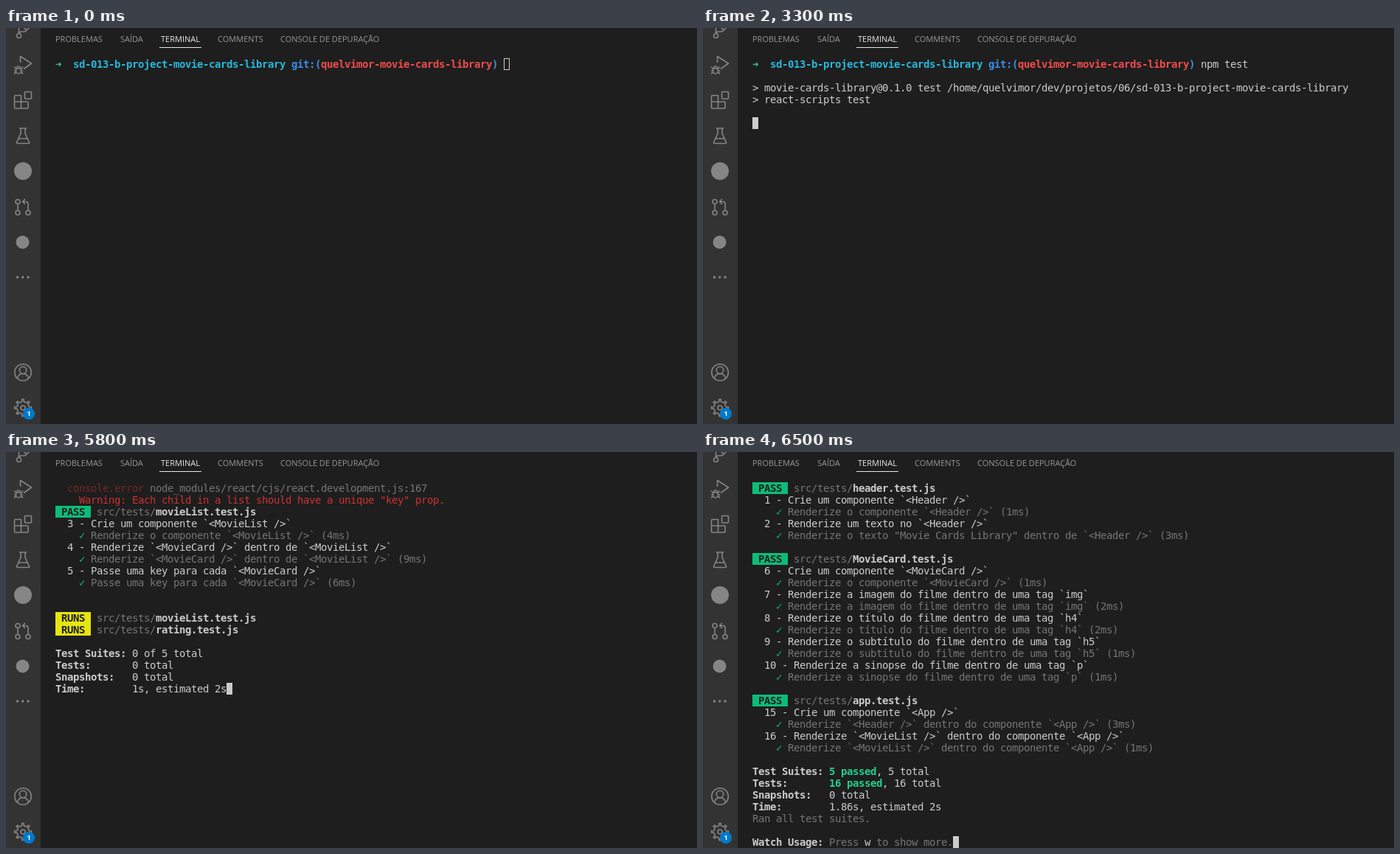
Write an HTML page that moves like this. It is 937x537 px and loops after 8000 ms.

```html
<!DOCTYPE html>
<html lang="pt-BR">
<head>
<meta charset="utf-8">
<title>Terminal</title>
<style>
  html, body { margin: 0; width: 100%; height: 100%; overflow: hidden; background: #1e1e1e; }
  #stage { position: relative; width: 937px; height: 537px; overflow: hidden; background: #1e1e1e; }
  #bar { position: absolute; left: 0; top: 0; background: #333; }
  #bar .line { fill: none; stroke: #858585; stroke-width: 1.6; stroke-linejoin: round; }
  #bar .solid { fill: #858585; }
  #tabs span {
    position: absolute; top: 7px; white-space: pre; color: #979797;
    font: 11px/16px "Open Sans", sans-serif;
  }
  #tabs .on { color: #e7e7e7; }
  #tabs i { position: absolute; left: 208px; top: 26px; width: 57px; height: 1px; background: #e7e7e7; }
  #term {
    position: absolute; left: 67px; top: 41px; color: #ccc;
    font: 14px/16px "DejaVu Sans Mono", monospace; letter-spacing: calc(8px - 1ch);
    font-variant-ligatures: none;
  }
  #term div { height: 16px; white-space: pre; }
  #term span { display: inline-block; height: 16px; vertical-align: top; }
  .b, .G, .a, .c, .u, .e, .p, .y { font-weight: bold; }
  .d { color: #757575; }
  .r { color: #cd3131; }
  .R { color: #762828; }
  .G, .a { color: #23d18b; }
  .g { color: #0dbc79; }
  .a, .g { width: 8px; }
  .c { color: #29b8db; }
  .u { color: #3b8eea; }
  .e { color: #f14c4c; }
  .p, .y { color: #1e1e1e; background: #0dbc79; }
  .y { background: #e5e510; }
  #cursor {
    position: absolute; width: 8px; height: 16px; box-sizing: border-box;
    border: 1px solid #ccc; background: #ccc;
  }
  #cursor.hollow { background: none; }
</style>
</head>
<body>
<div id="stage">
  <svg id="bar" width="47" height="537">
    <g class="line">
      <circle cx="17.5" cy="10.5" r="3"/><circle cx="28" cy="-1" r="3"/>
      <path d="M17.5 7.5V-4M28 2q0 3-4 3h-3q-3 0-3.500 2.500"/>
      <path d="M19.500 47V38.500L34.500 48 24 55.500"/>
      <path d="M13.500 55h7v3a3.500 4 0 0 1-7 0zM14.500 55a2.500 3 0 0 1 5 0M11 52.500l2.500 2.500M23 52.500L20.500 55M11 58h2.500M20.500 58H23M11 62l2.800-2M23 62l-2.800-2"/>
      <path d="M12.500 91.500h8v8.500h8.500q1 0 1 1v7q0 1-1 1h-16.500q-1 0-1-1v-15.500q0-1 1-1zM11.500 100h9v9"/>
      <rect x="25.500" y="86.500" width="9" height="9.500" rx="1"/>
      <path d="M18 136h10M20 136v7l-5.500 12q-.5 1.500 1 1.500h15q1.500 0 1-1.500l-5.500-12v-7M17.500 150h11"/>
      <circle cx="16" cy="235.500" r="3"/><circle cx="16" cy="250.500" r="3"/><circle cx="30" cy="250.500" r="3"/>
      <path d="M16 238.500v9M30 247.500v-9q0-3-3-3h-4M26 232l-3.500 3.500 3.500 3.500"/>
      <circle cx="23" cy="467" r="11.300"/><circle cx="23" cy="464" r="4.700"/>
      <path d="M15.500 475.500q1-6.800 7.500-6.800t7.500 6.800"/>
      <path id="gear"/><circle cx="23" cy="515" r="3"/>
    </g>
    <g class="solid">
      <circle cx="23" cy="194" r="12"/>
      <circle cx="22.500" cy="290.500" r="9"/>
      <circle cx="15.500" cy="338" r="1.700"/><circle cx="22.700" cy="338" r="1.700"/><circle cx="30" cy="338" r="1.700"/>
    </g>
    <circle cx="31" cy="523" r="8" fill="#007acc"/>
    <text x="31" y="526.200" fill="#fff" font-family="Open Sans, sans-serif" font-size="9" font-weight="bold" text-anchor="middle">1</text>
  </svg>
  <div id="tabs">
    <span style="left:67px">PROBLEMAS</span>
    <span style="left:155px">SAÍDA</span>
    <span class="on" style="left:210px">TERMINAL</span>
    <span style="left:287px">COMMENTS</span>
    <span style="left:372px">CONSOLE DE DEPURAÇÃO</span>
    <i></i>
  </div>
  <div id="term"></div>
</div>
<script>
const LOOP = 8000, ROWS = 31;
const term = document.getElementById('term');

// Gear outline: eight teeth, four corners each.
document.getElementById('gear').setAttribute('d', 'M' + Array.from({ length: 32 }, (_, i) => {
  const angle = (Math.floor(i / 4) + [-.2, -.13, .13, .2][i % 4]) * Math.PI / 4;
  const r = i % 4 === 1 || i % 4 === 2 ? 11.5 : 8.3;
  return (23 + r * Math.cos(angle)).toFixed(1) + ' ' + (515 + r * Math.sin(angle)).toFixed(1);
}).join('L') + 'Z');

// Styled text is written {class|text}.
const TAG = /\{(\w)\|(.*?)\}/;
const prompt = '{a|➜}  {c|sd-013-b-project-movie-cards-library} {u|git:(}{e|quelvimor-movie-cards-library}{u|)} ';
const file = name => `{d|src/tests/}{b|${name}.test.js}`;
const pass = name => `{p| PASS } ${file(name)}`;
const runs = name => `{y| RUNS } ${file(name)}`;
const test = (n, title, ms, done = title) => [
  `  ${n} - ${title}`,
  `    {g|✓} {d|${done} (${ms}ms)}`
];
const label = (name, value) => `{b|${name.padEnd(13)}}${value}`;
const key = (name, action) => ` {d|› Press }${name}{d| to ${action}.}`;
const failedProp = (...trace) => [
  '  {R|console.error} {d|node_modules/prop-types/checkPropTypes.js:20}',
  '    {r|Warning: Failed prop type: The prop `rating` is marked as required in `Rating`, but its value is `undefined`.}',
  ...trace.map(s => `        {r|in ${s}}`),
  ''
];

const launch = [
  '',
  '> movie-cards-library@0.1.0 test /home/quelvimor/dev/projetos/06/sd-013-b-project-movie-cards-library',
  '> react-scripts test',
  '',
  ''
];

const usage = [
  '{b|No tests found related to files changed since last commit.}',
  '{d|Press `a` to run all tests, or run Jest with `--watchAll`.}',
  '',
  '{b|Watch Usage}',
  key('a', 'run all tests'),
  key('f', 'run only failed tests'),
  key('q', 'quit watch mode'),
  key('p', 'filter by a filename regex pattern'),
  key('t', 'filter by a test name regex pattern'),
  key('Enter', 'trigger a test run'),
  ''
];

const movieList = [
  '  {R|console.error} {d|node_modules/react/cjs/react.development.js:167}',
  '    {r|Warning: Each child in a list should have a unique "key" prop.}',
  pass('movieList'),
  ...test(3, 'Crie um componente `<MovieList />`', 4, 'Renderize o componente `<MovieList />`'),
  ...test(4, 'Renderize `<MovieCard />` dentro de `<MovieList />`', 9),
  ...test(5, 'Passe uma key para cada `<MovieCard />`', 6),
  ''
];

const rating = [
  ...failedProp('Rating (at rating.test.js:34)'),
  ...failedProp('Rating (at MovieCard.jsx:18)', 'MovieCard (at MovieList.jsx:13)',
    'main (at MovieList.jsx:12)', 'MovieList (created by WrapperComponent)', 'WrapperComponent'),
  pass('rating'),
  ...test(11, 'Crie um componente `<Rating />`', 5, 'Renderize o componente `<Rating />`'),
  ...test(12, 'Renderize a nota de um filme dentro de `Rating`', 5),
  ...test(13, 'Renderize o componente `<Rating />` dentro de `<MovieCard />`', 2),
  ...test(14, 'Passe como prop para o componente `<Rating/>` o atributo `rating`', 41,
    'Passe como prop para o componente `<Rating />` o atributo `rating`'),
  ''
];

const header = [
  pass('header'),
  ...test(1, 'Crie um componente `<Header />`', 1, 'Renderize o componente `<Header />`'),
  ...test(2, 'Renderize um texto no `<Header />`', 3,
    'Renderize o texto "Movie Cards Library" dentro de `<Header />`'),
  ''
];

const movieCard = [
  pass('MovieCard'),
  ...test(6, 'Crie um componente `<MovieCard />`', 1, 'Renderize o componente `<MovieCard />`'),
  ...test(7, 'Renderize a imagem do filme dentro de uma tag `img`', 2),
  ...test(8, 'Renderize o título do filme dentro de uma tag `h4`', 2),
  ...test(9, 'Renderize o subtítulo do filme dentro de uma tag `h5`', 1),
  ...test(10, 'Renderize a sinopse do filme dentro de uma tag `p`', 1),
  ''
];

const app = [
  pass('app'),
  ...test(15, 'Crie um componente `<App />`', 3, 'Renderize `<Header />` dentro do componente `<App />`'),
  ...test(16, 'Renderize `<MovieList />` dentro do componente `<App />`', 1),
  ''
];

const status = seconds => [
  '',
  runs('movieList'),
  runs('rating'),
  '',
  label('Test Suites:', '0 of 5 total'),
  label('Tests:', '0 total'),
  label('Snapshots:', '0 total'),
  label('Time:', `${seconds}s, estimated 2s`)
];

const summary = [
  label('Test Suites:', '{G|5 passed}, 5 total'),
  label('Tests:', '{G|16 passed}, 16 total'),
  label('Snapshots:', '0 total'),
  label('Time:', '1.86s, estimated 2s'),
  '{d|Ran all test suites.}',
  '',
  '{b|Watch Usage:} {d|Press }w{d| to show more.}'
];

const typed = n => [prompt + 'npm test'.slice(0, n)];
const early = [...movieList, ...rating];

// [start in ms, lines]; the cursor sits after the last line.
const steps = [
  [0, typed(0)],
  [1000, typed(0)],
  [1800, typed(1)],
  ...[2, 3, 4, 5, 6].map((n, i) => [2000 + i * 100, typed(n)]),
  [2600, typed(8)],
  [3100, [...typed(8), '']],
  [3300, [...typed(8), ...launch]],
  [3900, usage],
  [4700, ['{d|Determining test suites to run...}']],
  [4800, status(0)],
  [5800, [...movieList, ...status(1)]],
  [6200, [...early, ...status(1)]],
  [6300, [...early, ...header, ...status(1)]],
  [6400, [...early, ...header, ...movieCard, ...status(1)]],
  [6500, [...early, ...header, ...movieCard, ...app, ...summary]]
];

function lineNode(line) {
  const row = document.createElement('div');
  const parts = line.split(TAG);
  for (let i = 0; i < parts.length; i += 3) {
    row.append(parts[i]);
    if (i + 2 < parts.length) {
      const span = document.createElement('span');
      span.className = parts[i + 1];
      span.textContent = parts[i + 2];
      row.append(span);
    }
  }
  return row;
}

function show(lines, hollow) {
  const rows = lines.slice(-ROWS).map(lineNode);
  const last = rows.length - 1;
  const cursor = document.createElement('i');
  cursor.id = 'cursor';
  cursor.className = hollow ? 'hollow' : '';
  cursor.style.left = rows[last].textContent.length * 8 + 'px';
  cursor.style.top = last * 16 + 'px';
  term.replaceChildren(...rows, cursor);
}

const start = performance.now();
let current = -1;

function tick() {
  const t = (performance.now() - start) % LOOP;
  const index = steps.filter(step => step[0] <= t).length - 1;
  if (index !== current) {
    current = index;
    show(steps[index][1], index === 0);
  }
  requestAnimationFrame(tick);
}
tick();
</script>
</body>
</html>
```
